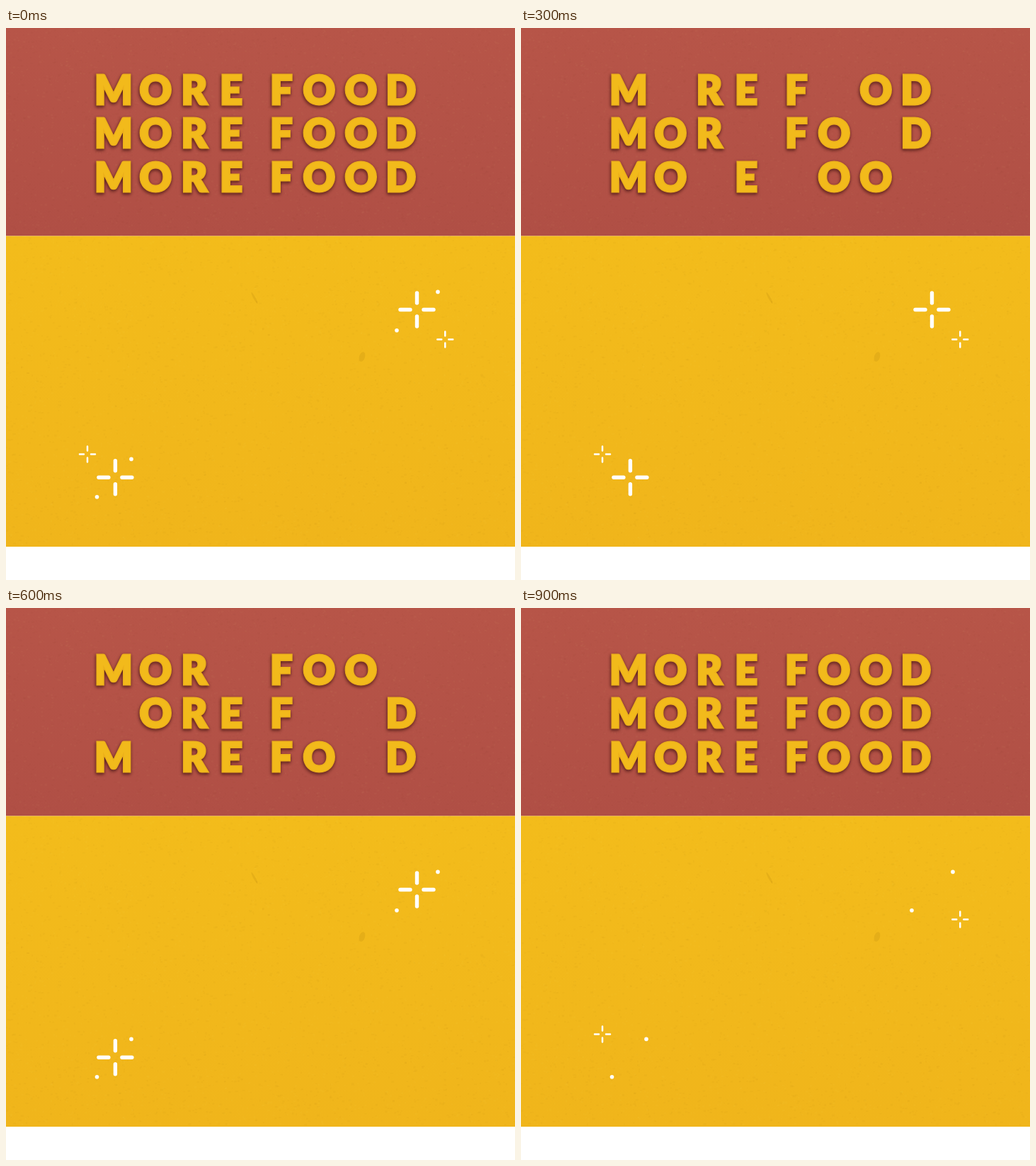
An HTML page with a canvas for the animation above (1200 ms loop, 719x779 px).

```html
<!DOCTYPE html>
<html lang="en">
<head>
<meta charset="utf-8">
<title>More food</title>
<style>
  html, body { margin: 0; width: 100%; height: 100%; overflow: hidden; background: #fff; }
  canvas { display: block; }
</style>
</head>
<body>
<canvas width="719" height="779" role="img" aria-label="More food, more food, more food"></canvas>
<script>
const ctx = document.querySelector('canvas').getContext('2d');
const STEP = 300;
const WORD = 'MOREFOOD';
const CENTERS = [151.5, 211.5, 268, 319, 390, 442.5, 501.5, 559];
const CAP = 41.5, EDGE = 3, BASELINE = 108, PITCH = 61.3;

// One entry per step: three rows of letters and the visible sparkle parts.
const STEPS = [
  { rows: [WORD, WORD, WORD], big: 1, small: 1, dots: 1 },
  { rows: ['M REF OD', 'MOR FO D', 'MO E OO '], big: 1, small: 1, dots: 0 },
  { rows: ['MOR FOO ', ' OREF  D', 'M REFO D'], big: 1, small: 0, dots: 1 },
  { rows: [WORD, WORD, WORD], big: 0, small: 1, dots: 1 }
];

const SPARKLES = [
  { big: [580.5, 397.5], small: [620.3, 439.5], dots: [[610, 372.4], [552, 426.7]] },
  { big: [154.4, 634.3], small: [115, 601.4], dots: [[177, 608.4], [128.5, 661.7]] }
];

const font = size => `900 ${size}px Lato, Inter, sans-serif`;
ctx.font = font(100);
const fontSize = 100 * CAP / ctx.measureText('E').actualBoundingBoxAscent;

function panel(y, height, top, bottom) {
  const fill = ctx.createLinearGradient(0, y, 0, y + height);
  fill.addColorStop(0, top);
  fill.addColorStop(1, bottom);
  ctx.fillStyle = fill;
  ctx.fillRect(0, y, 719, height);
}

function paperGrain() {
  let seed = 7;
  const random = () => (seed = seed * 16807 % 2147483647) / 2147483647;
  for (let i = 0; i < 9000; i++) {
    ctx.fillStyle = i % 2 ? 'rgba(255,225,150,.025)' : 'rgba(90,40,0,.025)';
    ctx.fillRect(random() * 719, random() * 728, 1 + random() * 3, 1 + random() * 2);
  }
}

function smudge(x, y, rx, ry, tilt) {
  ctx.fillStyle = 'rgba(150,100,10,.13)';
  ctx.beginPath();
  ctx.ellipse(x, y, rx, ry, tilt, 0, 2 * Math.PI);
  ctx.fill();
}

function letter(char, center, y) {
  const box = ctx.measureText(char);
  const x = center - (box.actualBoundingBoxRight - box.actualBoundingBoxLeft) / 2;
  ctx.save();
  ctx.shadowColor = 'rgba(50,12,8,.9)';
  ctx.shadowBlur = 4;
  ctx.shadowOffsetX = -0.5;
  ctx.shadowOffsetY = 2;
  ctx.strokeStyle = '#ecb01b';
  ctx.strokeText(char, x, y);
  ctx.restore();
  ctx.fillStyle = '#f2ba1b';
  ctx.fillText(char, x, y);
}

function cross([x, y], inner, outer, width) {
  ctx.lineWidth = width;
  ctx.beginPath();
  for (const [dx, dy] of [[1, 0], [0, 1], [-1, 0], [0, -1]]) {
    ctx.moveTo(x + dx * inner, y + dy * inner);
    ctx.lineTo(x + dx * outer, y + dy * outer);
  }
  ctx.stroke();
}

function dot([x, y]) {
  ctx.beginPath();
  ctx.arc(x, y, 2.8, 0, 2 * Math.PI);
  ctx.fill();
}

function draw({ rows, big, small, dots }) {
  ctx.clearRect(0, 0, 719, 779);
  panel(0, 293.5, '#b75548', '#b04f45');
  panel(293.5, 438.5, '#f3bc1b', '#f0b51b');
  paperGrain();
  smudge(351, 381, 1.5, 9, -0.5);
  smudge(503, 464, 4, 7, 0.3);

  ctx.font = font(fontSize);
  ctx.lineWidth = EDGE;
  ctx.lineJoin = 'miter';
  ctx.miterLimit = 3;
  rows.forEach((row, r) => [...row].forEach((char, i) => {
    if (char !== ' ') letter(char, CENTERS[i], BASELINE + r * PITCH);
  }));

  ctx.strokeStyle = ctx.fillStyle = '#fff';
  ctx.lineCap = 'round';
  for (const sparkle of SPARKLES) {
    if (big) cross(sparkle.big, 9.5, 23.5, 5.4);
    if (small) cross(sparkle.small, 5, 11, 2.5);
    if (dots) sparkle.dots.forEach(dot);
  }
}

let shown = -1;
function tick() {
  const step = Math.floor(performance.now() / STEP) % STEPS.length;
  if (step !== shown) draw(STEPS[shown = step]);
  requestAnimationFrame(tick);
}
tick();
</script>
</body>
</html>
```
